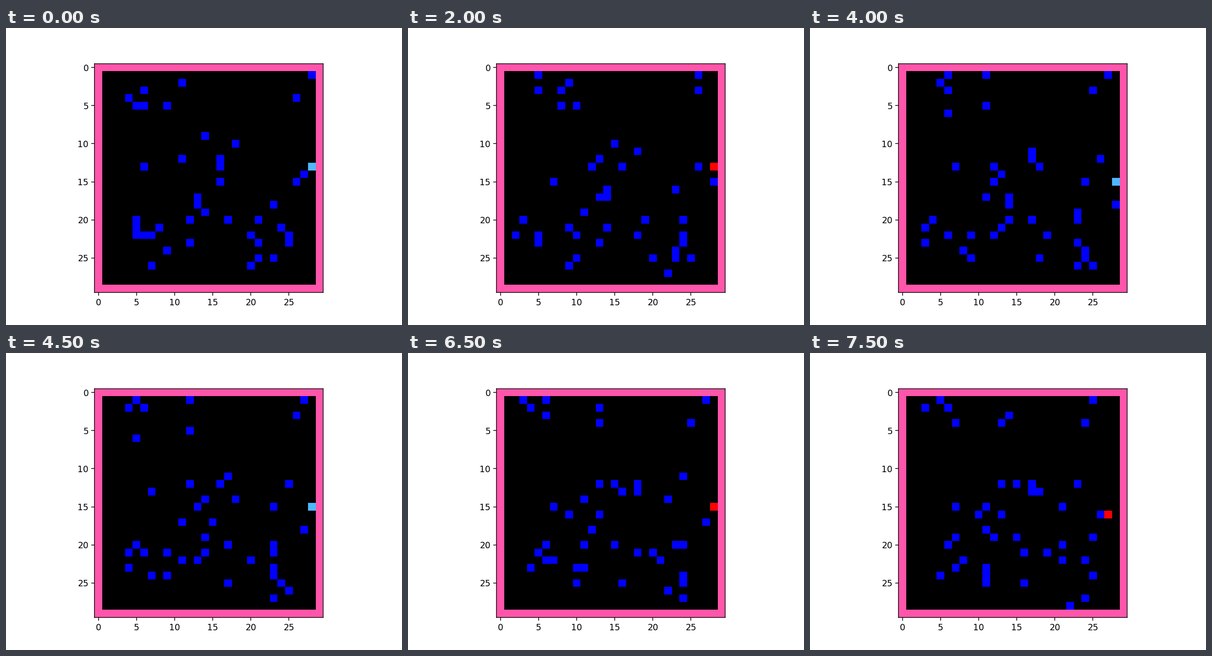
A matplotlib script that plays this animation: 864x648 px, repeating every 8 s.

```python
import random

import matplotlib.pyplot as plt
import numpy as np
from matplotlib.animation import FuncAnimation
from matplotlib.colors import ListedColormap

SIZE = 30
STEPS = 16
INTERVAL = 500

EMPTY, WALL, WALKER, CALM, EXCITED = range(5)
COLORS = ["#000000", "#ff55aa", "#0000ff", "#4db8ff", "#ff0000"]
MOVES = [(0, 0), (1, 0), (-1, 0), (0, 1), (0, -1)]

# Groups of walkers: centre column and row, spread in both, head count.
GROUPS = [
    (6, 4, 3, 2, 6),
    (15, 14, 3, 2.5, 8),
    (8, 22, 3.2, 3.2, 12),
    (23, 22, 3, 3, 10),
    (26, 14, 1, 1, 2),
    (25, 4, 1.5, 2, 2),
    (3, 13, 1.5, 1, 1),
]


def special_cell(step):
    """The lone coloured cell slides down the right wall, then leaves it."""
    x = round(np.interp(step, [13, 15], [28, 27]))
    y = round(np.interp(step, [4, 6, 13, 15], [13, 15, 15, 16]))
    return x, y


def special_state(step):
    return EXCITED if 1 <= step <= 4 or step >= 10 else CALM


def is_inside(cell):
    return all(0 < c < SIZE - 1 for c in cell)


def scatter(rng):
    cells = []
    for cx, cy, sx, sy, count in GROUPS:
        goal = len(cells) + count
        while len(cells) < goal:
            cell = round(rng.gauss(cx, sx)), round(rng.gauss(cy, sy))
            if is_inside(cell) and cell not in cells and cell != special_cell(0):
                cells.append(cell)
    return cells


def advance(cells, blocked, rng):
    """Move every walker to a free neighbour cell, or let it rest."""
    cells = list(cells)
    for i, (x, y) in enumerate(cells):
        taken = set(cells[:i] + cells[i + 1:]) | {blocked}
        near = [(x + dx, y + dy) for dx, dy in MOVES]
        free = [c for c in near if is_inside(c) and c not in taken]
        cells[i] = rng.choice(free or [(x, y)])
    return cells


def simulate(seed):
    rng = random.Random(seed)
    history = [scatter(rng)]
    for step in range(1, STEPS):
        history.append(advance(history[-1], special_cell(step), rng))
    return history


history = simulate(seed=4)


def render(step):
    grid = np.full((SIZE, SIZE), WALL)
    grid[1:-1, 1:-1] = EMPTY
    for x, y in history[step]:
        grid[y, x] = WALKER
    x, y = special_cell(step)
    grid[y, x] = special_state(step)
    return grid


fig, ax = plt.subplots(figsize=(6.4, 4.8), dpi=135)
edges = np.arange(SIZE + 1) - 0.5
mesh = ax.pcolormesh(edges, edges, render(0), cmap=ListedColormap(COLORS),
                     vmin=EMPTY, vmax=EXCITED)
ax.set_aspect("equal")
ax.set_xlim(edges[0], edges[-1])
ax.set_ylim(edges[-1], edges[0])


def update(step):
    mesh.set_array(render(step))
    return (mesh,)


anim = FuncAnimation(fig, update, frames=STEPS, interval=INTERVAL,
                     repeat=True, repeat_delay=0)
plt.show()
```
